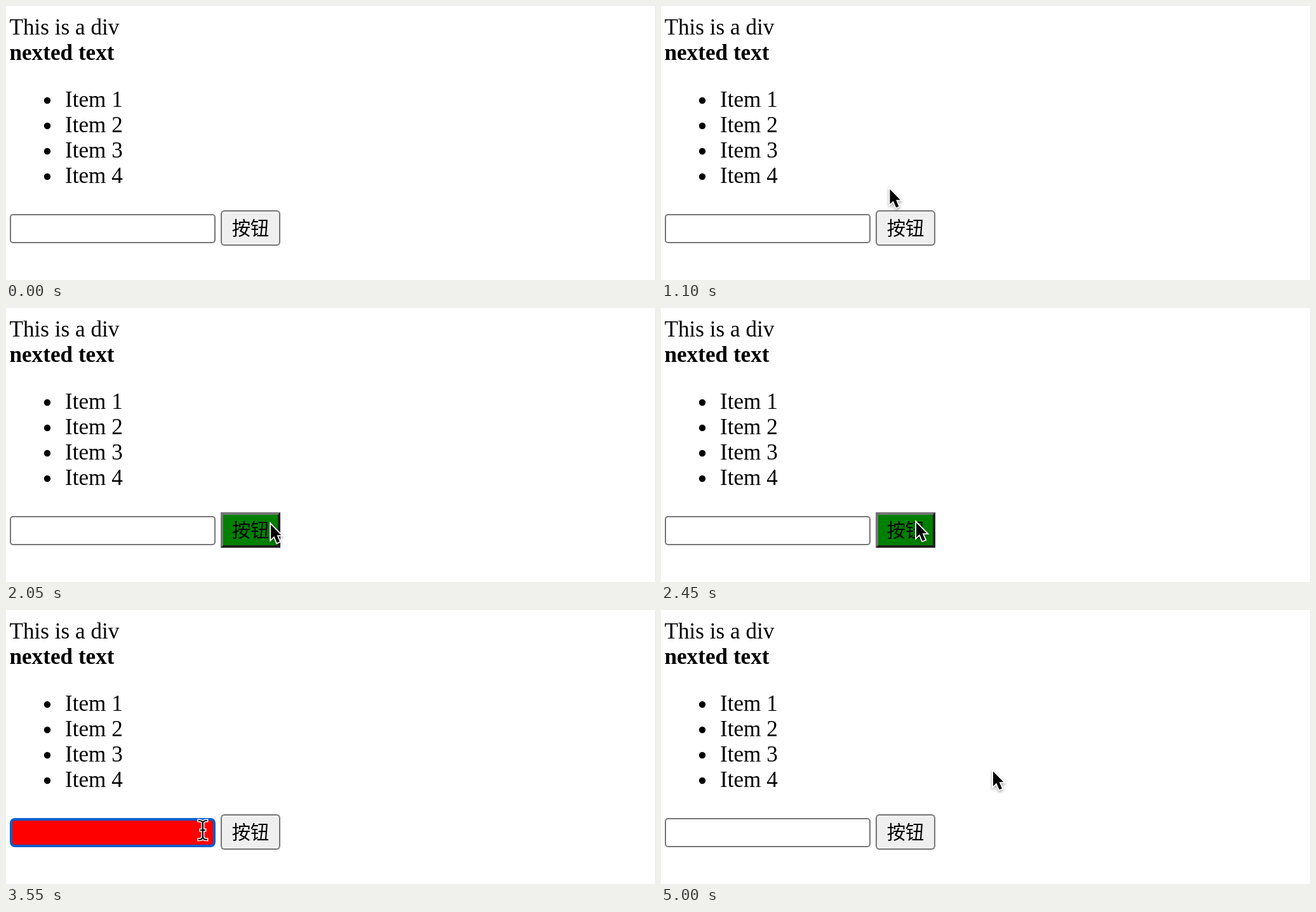
Animation, 1022 px wide and 432 px high, one loop 5130 ms. Source, as an HTML page with a canvas:

```html
<!DOCTYPE html>
<html lang="zh-CN">
<head>
<meta charset="utf-8">
<title>Focus and hover</title>
<style>
  html, body { margin: 0; width: 100%; height: 100%; overflow: hidden; background: #fff; }
  canvas { display: block; }
</style>
</head>
<body>
<canvas id="stage" width="1022" height="432"></canvas>
<script>
const ctx = document.getElementById('stage').getContext('2d');
const LOOP = 5130, STEP = 50;
const FOCUS_AT = 2600, BLUR_AT = 4100, BLINK = 500;
const SERIF = '35.2px "Liberation Serif", serif';
const INPUT = { x: 6, y: 328, w: 324, h: 46 };
const BUTTON = { x: 338, y: 322, w: 94, h: 56 };

// Pointer path: time, x, y
const PATH = [
  [50, 503, 424], [300, 440, 340], [550, 387, 277], [800, 364, 280],
  [1000, 363, 281], [1100, 360.5, 289], [1250, 372, 326], [1500, 388, 337],
  [1750, 396, 339], [1950, 396, 339], [2050, 417, 341.5], [2250, 584, 338],
  [2450, 402, 338.5], [2600, 265, 352], [2700, 236, 356], [2900, 234.5, 353],
  [3000, 238, 353], [3100, 234.5, 353], [3400, 234.5, 353], [3600, 335, 345],
  [3750, 432, 318], [3950, 523, 254.5]
];

const lerp = (a, b, k) => a + (b - a) * k;
const inside = (p, r) => p.x >= r.x && p.x < r.x + r.w && p.y >= r.y && p.y < r.y + r.h;

function pointerAt(t) {
  if (t < PATH[0][0]) return null;
  const next = PATH.findIndex(p => p[0] > t);
  if (next < 0) {
    const [, x, y] = PATH[PATH.length - 1];
    return { x, y };
  }
  const [t0, x0, y0] = PATH[next - 1], [t1, x1, y1] = PATH[next];
  const k = (t - t0) / (t1 - t0);
  return { x: lerp(x0, x1, k), y: lerp(y0, y1, k) };
}

function polygon(points, color) {
  ctx.beginPath();
  points.forEach(([x, y]) => ctx.lineTo(x, y));
  ctx.closePath();
  ctx.fillStyle = color;
  ctx.fill();
}

function roundBox(r, inset, radius, color) {
  ctx.beginPath();
  ctx.roundRect(r.x + inset, r.y + inset, r.w - 2 * inset, r.h - 2 * inset, radius);
  ctx.fillStyle = color;
  ctx.fill();
}

function text(str, x, y, font) {
  ctx.font = font;
  ctx.fillStyle = '#000';
  ctx.fillText(str, x, y);
}

function drawPage() {
  text('This is a div', 5.4, 45, SERIF);
  text('nexted text', 5.4, 85, 'bold ' + SERIF);
  for (let i = 0; i < 4; i++) {
    const y = 159 + i * 40;
    text('Item ' + (i + 1), 93, y, SERIF);
    ctx.beginPath();
    ctx.arc(65, y - 10, 5.2, 0, Math.PI * 2);
    ctx.fill();
  }
}

function drawInput(focused, caret) {
  if (!focused) {
    roundBox(INPUT, 0, 5, '#767676');
    roundBox(INPUT, 2, 3, '#fff');
    return;
  }
  roundBox(INPUT, 0, 8, '#005fcc');
  roundBox(INPUT, 4, 4, '#f00');
  if (caret) {
    ctx.fillStyle = '#000';
    ctx.fillRect(14, 334, 2, 32);
  }
}

function drawButton(hovered) {
  const { x, y, w, h } = BUTTON;
  if (hovered) {
    ctx.fillStyle = '#212121';
    ctx.fillRect(x, y, w, h);
    polygon([[x, y], [x + w, y], [x + w - 4, y + 4], [x + 4, y + 4],
      [x + 4, y + h - 4], [x, y + h]], '#767676');
    ctx.fillStyle = '#008000';
    ctx.fillRect(x + 4, y + 4, w - 8, h - 8);
  } else {
    roundBox(BUTTON, 0, 6, '#767676');
    roundBox(BUTTON, 2, 4, '#efefef');
  }
  text('按钮', 355.7, 361, '29.33px "Noto Sans CJK SC", "Noto Sans CJK", sans-serif');
}

function drawArrow() {
  const shape = new Path2D('M0 0V23.3L5.3 18.2L9.7 28.7L14 26.9L9.6 16.7H16.3Z');
  ctx.lineWidth = 3.6;
  ctx.strokeStyle = '#fff';
  ctx.shadowColor = 'rgba(0,0,0,.38)';
  ctx.shadowBlur = 4;
  ctx.shadowOffsetY = 2;
  ctx.stroke(shape);
  ctx.shadowColor = 'transparent';
  ctx.fillStyle = '#000';
  ctx.fill(shape);
}

function drawBeam() {
  const shape = new Path2D('M-6 -15Q0 -15 0 -10V10Q0 15 -6 15' +
    'M6 -15Q0 -15 0 -10M0 10Q0 15 6 15M-3 0H3');
  ctx.lineCap = 'square';
  for (const [width, color] of [[5.2, '#fff'], [2.2, '#000']]) {
    ctx.lineWidth = width;
    ctx.strokeStyle = color;
    ctx.stroke(shape);
  }
}

function render(time) {
  const t = Math.floor((time % LOOP) / STEP) * STEP;
  const pointer = pointerAt(t);
  const focused = t >= FOCUS_AT && t < BLUR_AT;
  const caret = Math.floor((t - FOCUS_AT) / BLINK) % 2 === 0;

  ctx.fillStyle = '#fff';
  ctx.fillRect(0, 0, 1022, 432);
  drawPage();
  drawInput(focused, caret);
  drawButton(pointer && inside(pointer, BUTTON));
  if (pointer) {
    ctx.save();
    ctx.translate(pointer.x, pointer.y);
    inside(pointer, INPUT) ? drawBeam() : drawArrow();
    ctx.restore();
  }
}

const start = performance.now();
function tick() {
  render(performance.now() - start);
  requestAnimationFrame(tick);
}
tick();
</script>
</body>
</html>
```
